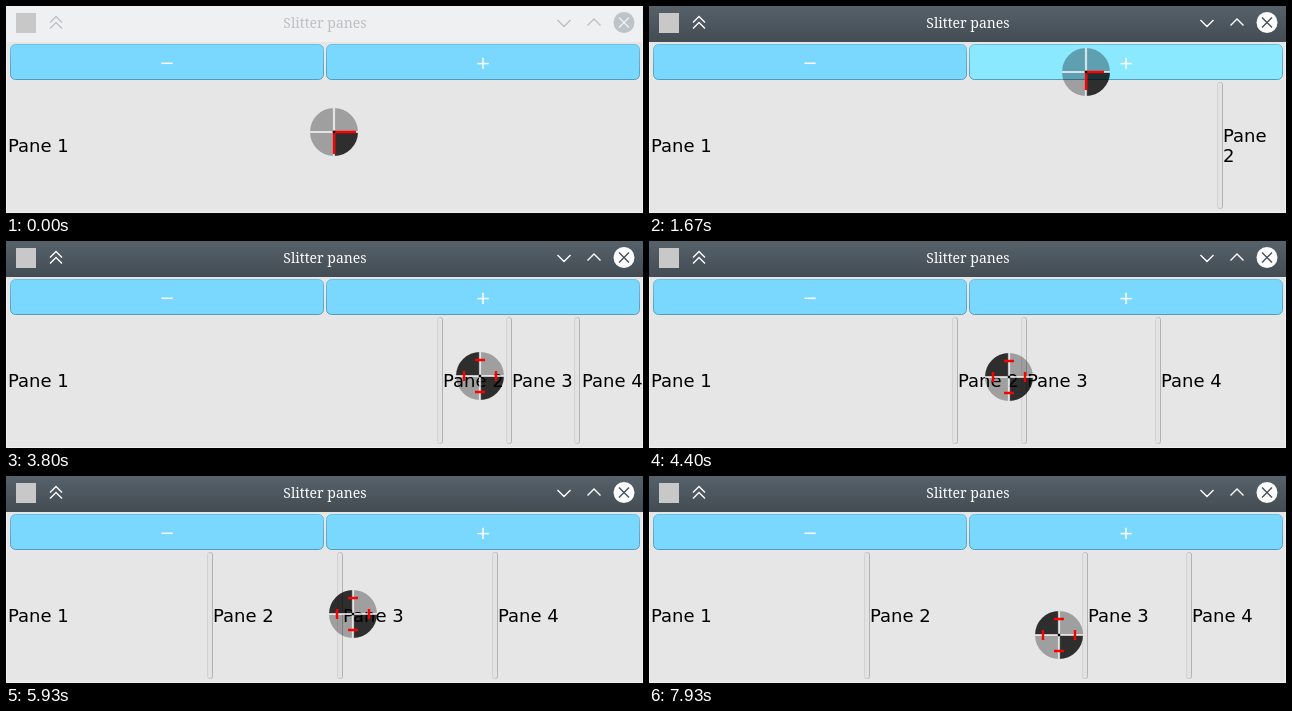
Animation of 637 by 207 pixels, one loop 8 s. Source, as an HTML page:

```html
<!DOCTYPE html>
<html lang="en">
<head>
<meta charset="utf-8">
<title>Slitter panes</title>
<style>
  html, body { margin: 0; width: 100%; height: 100%; overflow: hidden; background: #e6e6e6; }
  svg { display: block; width: 637px; height: 207px; }
  .label { font: 18px "DejaVu Sans", sans-serif; fill: #000; }
  .sign { font: 18px "DejaVu Sans", sans-serif; fill: #fff; text-anchor: middle; }
  .title { font: 14px "Noto Serif", serif; text-anchor: middle; }
  .sep { fill: #e3e3e3; stroke: url(#edge); }
  .btn { stroke: url(#rim); }
  .icon { fill: none; stroke-width: 1.4; }
  .red { fill: none; stroke: #f00; stroke-width: 2.4; }
</style>
</head>
<body>
<svg viewBox="0 0 637 207">
  <defs>
    <linearGradient id="bar" x2="0" y2="1">
      <stop stop-color="#56616a"/><stop offset="1" stop-color="#434c53"/>
    </linearGradient>
    <linearGradient id="edge">
      <stop stop-color="#d2d2d2"/><stop offset="1" stop-color="#b2b2b2"/>
    </linearGradient>
    <linearGradient id="rim" x2="0" y2="1">
      <stop stop-color="#6cbfe2"/><stop offset="1" stop-color="#4f9cbd"/>
    </linearGradient>
  </defs>
  <rect width="637" height="207" fill="#eff0f1"/>
  <rect x="1" y="36" width="635" height="170" fill="#e6e6e6"/>
  <rect id="head" width="637" height="36"/>
  <rect x="10" y="7" width="20" height="20" fill="#c8c8c8"/>
  <text id="title" class="title" x="319" y="22">Slitter panes</text>
  <path id="marks" class="icon" d="M44 16.5l6-6 6 6M44 22.5l6-6 6 6M551.5 14l6.500 6.500 6.500-6.500M581.500 19.500l6.500-6.500 6.500 6.500"/>
  <circle id="close" cx="618" cy="16.500" r="10.500"/>
  <path id="cross" class="icon" d="M613 11.500l10 10m0-10l-10 10"/>
  <rect class="btn" x="4.500" y="38.500" width="313" height="35" rx="5" fill="#7ad8ff"/>
  <rect id="add" class="btn" x="320.500" y="38.500" width="313" height="35" rx="5"/>
  <text class="sign" x="161" y="63">−</text>
  <text class="sign" x="477" y="63">+</text>
  <text class="label" x="2" y="146">Pane 1</text>
  <g id="panes"></g>
  <g id="cursor">
    <path id="pale"/>
    <path id="dark"/>
    <path d="M-24 0H24M0-24V24" stroke="#fff" stroke-opacity=".72" stroke-width="2.200"/>
    <path id="arrow" class="red"/>
    <path id="ticks" class="red" d="M-5-16H5M-5 16H5M-16-5V5M16-5V5"/>
    <rect x="-1.200" y="-1.200" width="2.400" height="2.400"/>
  </g>
</svg>
<script>
const LOOP = 8000, STEP = 1000 / 15;
const $ = id => document.getElementById(id);

// Rows of [time, value, ...]
const PATH = [
  [0, 328, 126], [133, 328, 125], [200, 328, 125], [400, 340, 118], [733, 416, 78],
  [933, 437, 66], [2200, 437, 66], [2533, 512, 90], [3067, 512, 121], [3333, 505, 129],
  [3400, 505, 129], [3600, 497, 132], [3800, 474, 135], [4267, 379, 136], [5000, 274, 137],
  [5133, 273, 137], [5467, 273, 137], [6267, 400, 138], [6333, 400, 138], [6733, 454, 139],
  [7200, 546, 131], [7333, 556, 130], [7400, 556, 130], [7600, 515, 142], [7933, 410, 159]
];
const DRAG = [
  [3800, 503], [4267, 395], [5000, 283], [5133, 273], [5533, 273], [6267, 385],
  [6333, 385], [6733, 437], [7133, 503], [7600, 503], [7933, 436]
];
const RED = [
  [0, 22], [600, 0], [1000, 0], [1133, 4], [1200, 4], [1533, 18], [1667, 18],
  [1933, 12], [2000, 12], [2133, 0]
];
const ADDED = [1460, 1790, 1930];
const PRESSES = [[1320, 1460], [1720, 1790], [1855, 1930]];
const ACTIVE = 1320, RESIZE = 3060, UNWRAP = 3725;

function at(rows, t) {
  const i = rows.findIndex(r => r[0] >= t);
  if (i === 0) return rows[0].slice(1);
  if (i < 0) return rows[rows.length - 1].slice(1);
  const a = rows[i - 1], b = rows[i], k = (t - a[0]) / (b[0] - a[0]);
  return a.slice(1).map((v, n) => v + (b[n + 1] - v) * k);
}

const set = (el, attrs) => {
  for (const k in attrs) el.setAttribute(k, attrs[k]);
};

function make(parent, tag, attrs, text = "") {
  const el = document.createElementNS("http://www.w3.org/2000/svg", tag);
  set(el, attrs);
  el.textContent = text;
  return parent.appendChild(el);
}

const panes = [2, 3, 4].map(n => {
  const g = make($("panes"), "g", {});
  return {
    g,
    sep: make(g, "rect", { class: "sep", y: 76.5, width: 5, height: 126, rx: 2 }),
    one: make(g, "text", { class: "label", y: 146 }, "Pane " + n),
    top: make(g, "text", { class: "label", y: 136 }, "Pane"),
    low: make(g, "text", { class: "label", y: 156 }, n)
  };
});

const quarter = (sx, sy) =>
  `M0 0H${24 * sx}A24 24 0 0 ${sx * sy > 0 ? 1 : 0} 0 ${24 * sy}Z`;
const fan = list => list.map(q => quarter(...q)).join("");
const TL = [-1, -1], TR = [1, -1], BL = [-1, 1], BR = [1, 1];

// Freed space goes to the smallest pane; shrinking takes from the largest.
function separators(t, count) {
  if (t < UNWRAP) return [0, 1, 2].map(i => 571 - 68 * (count - 1 - i));
  const mid = at(DRAG, t)[0];
  const left = t < 5300 ? mid - 69 : Math.max(204, mid / 2);
  return [left, mid, (mid + 643) / 2];
}

function drawPanes(t) {
  const count = ADDED.filter(a => t >= a).length;
  const wrapped = t < UNWRAP;
  const show = (el, on) => set(el, { visibility: on ? "inherit" : "hidden" });
  separators(t, count).forEach((pos, i) => {
    const p = panes[i], x = Math.round(pos);
    set(p.g, { visibility: i < count ? "visible" : "hidden" });
    set(p.sep, { x: Math.min(x, 571) - 2.5 });
    for (const el of [p.one, p.top, p.low]) set(el, { x: x + 3 });
    show(p.one, !wrapped);
    show(p.top, wrapped);
    show(p.low, wrapped);
  });
}

function drawWindow(t, y) {
  const on = t >= ACTIVE;
  const ink = on ? "#fcfcfc" : "#bdc0c3";
  set($("head"), { fill: on ? "url(#bar)" : "#eff0f1" });
  set($("title"), { fill: ink });
  set($("marks"), { stroke: ink });
  set($("close"), { fill: on ? "#fcfcfc" : "#bdc3c7" });
  set($("cross"), { stroke: on ? "#475057" : "#eff0f1" });
  const down = PRESSES.some(([a, b]) => t >= a && t < b);
  set($("add"), { fill: down ? "#70cdf2" : y < 74 ? "#8ae8ff" : "#7ad8ff" });
}

function drawCursor(t, x, y) {
  const resize = t >= RESIZE;
  const len = at(RED, t)[0];
  set($("cursor"), { transform: `translate(${Math.round(x)} ${Math.round(y)})` });
  set($("pale"), { d: fan(resize ? [TR, BL] : [TL, TR, BL]), "fill-opacity": 0.31 });
  set($("dark"), { d: fan(resize ? [TL, BR] : [BR]), "fill-opacity": 0.8 });
  set($("arrow"), { d: len > 0 ? `M${len} 0H0V${len}` : "" });
  set($("ticks"), { visibility: resize ? "visible" : "hidden" });
}

function draw(time) {
  const t = Math.floor((time % LOOP + 5) / STEP) * STEP % LOOP;
  const [x, y] = at(PATH, t);
  drawWindow(t, y);
  drawPanes(t);
  drawCursor(t, x, y);
}

const start = performance.now();
function tick() {
  draw(performance.now() - start);
  requestAnimationFrame(tick);
}
tick();
</script>
</body>
</html>
```
